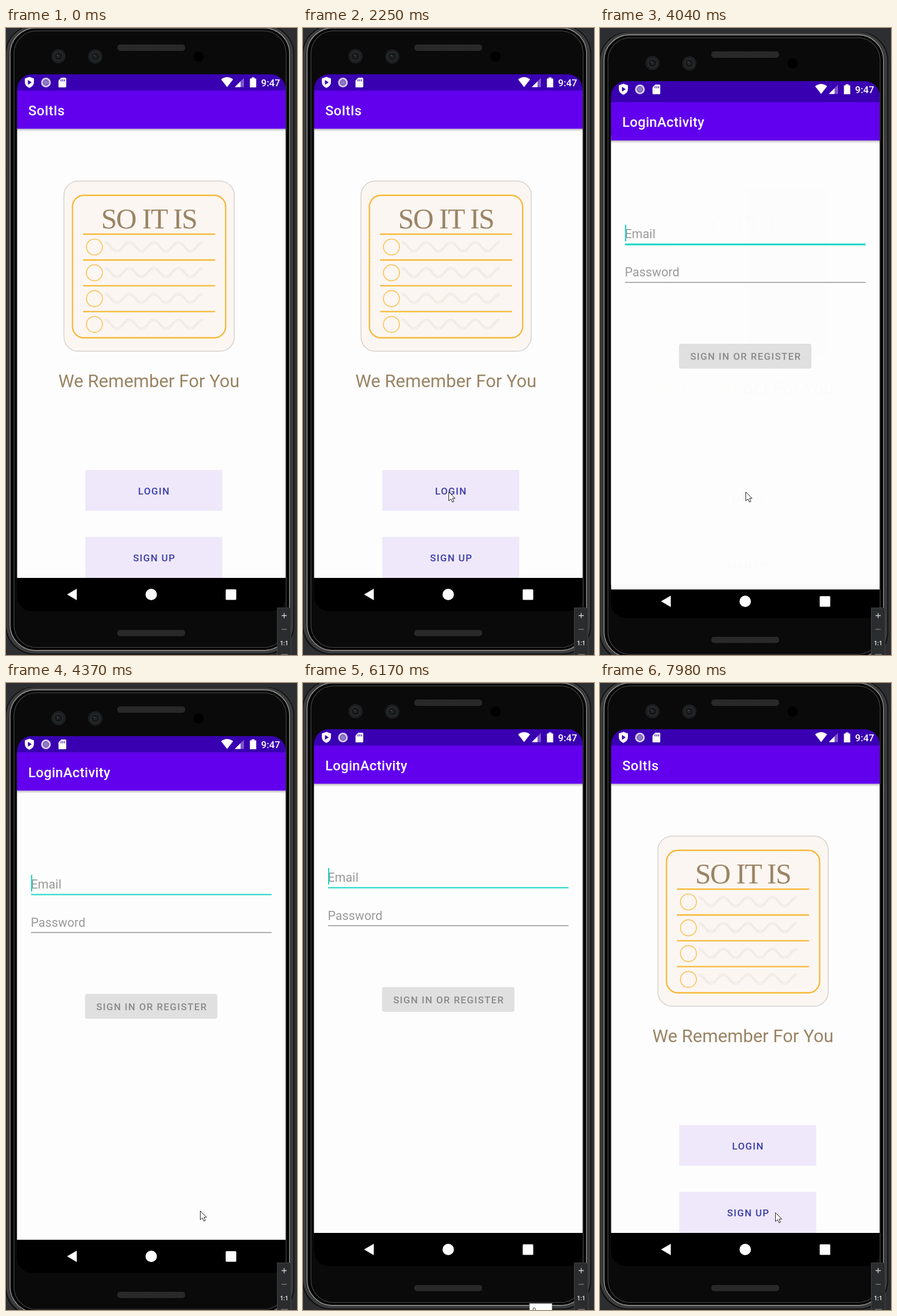
An HTML page that plays this animation: 510 px wide and 1098 px high, repeating every 8 s.

```html
<!DOCTYPE html>
<html lang="en">
<head>
<meta charset="utf-8">
<title>App demo</title>
<style>
html, body { margin: 0; width: 100%; height: 100%; overflow: hidden; background: #2c2e31; }
svg { display: block; width: 510px; height: 1098px; font-family: Roboto, sans-serif; }
.title { font-size: 24px; font-weight: 500; letter-spacing: .3px; fill: #fff; }
.label { font-size: 17px; font-weight: 500; letter-spacing: 1.4px; text-anchor: middle; }
.hint { font-size: 21.5px; letter-spacing: .1px; fill: #999; }
</style>
</head>
<body>
<svg viewBox="0 0 510 1098">
  <defs>
    <clipPath id="screen"><rect x="19.5" y="81" width="470.5" height="940" rx="26"/></clipPath>
    <linearGradient id="shade" x2="0" y2="1">
      <stop stop-color="#000" stop-opacity=".25"/><stop offset="1" stop-color="#000" stop-opacity="0"/>
    </linearGradient>
    <pattern id="mesh" width="3" height="3" patternUnits="userSpaceOnUse">
      <rect width="3" height="3" fill="#303030"/><circle cx="1.5" cy="1.5" r=".9" fill="#171717"/>
    </pattern>
    <g id="window">
      <path d="M19 81h472v29H19z" fill="#3900b1"/>
      <path d="M19 176h472v787H19z" fill="#fdfdfd"/>
      <path d="M19 176.500h472v5H19z" fill="url(#shade)"/>
      <path d="M19 109.500h472v67H19z" fill="#6200ee"/>
      <path d="M19 963h472v70H19z"/>
    </g>
    <g id="camera">
      <circle r="12.500" fill="#1d1f20"/>
      <circle r="7.500" fill="#151617" stroke="#2c3032" stroke-width="1.500"/>
      <circle r="3" fill="#222628"/><circle cx="-2" cy="-2" r="1" fill="#555"/>
    </g>
    <g id="item" fill="none">
      <path d="M135 361H366.500" stroke="#f7b733" stroke-width="2.400"/>
      <circle cx="155" cy="383.500" r="14" stroke="#fbc55a" stroke-width="1.700"/>
      <g stroke="#f1ebe5" stroke-width="2">
        <path id="wave" d="M173 374c10 0 11.500 15 21.500 15s11.500-15 21.500-15 11.500 15 21.500 15 11.500-15 21.500-15 11.500 15 21.500 15 11.500-15 21.500-15 11.500 15 21.500 15 11.500-15 21.500-15"/>
        <use href="#wave" y="3"/>
      </g>
    </g>
  </defs>

  <rect width="510" height="1098" fill="#2c2e31"/>
  <g id="phone">
    <g fill="none">
      <rect x="-1" y="-5" width="506" height="1102" rx="50" fill="#0c0c0c"/>
      <rect x="3" y="-2" width="498" height="1095" rx="48" stroke="#3b3b3b" stroke-width="5"/>
      <rect x="7" y="0" width="490" height="1090" rx="45" stroke="#858585" stroke-width="1.800"/>
      <rect x="10.500" y="3" width="483.500" height="1084" rx="42" fill="#0a0a0a" stroke="#000" stroke-width="4"/>
      <rect x="14" y="5" width="477" height="1080" rx="39" stroke="#3a3a3a" stroke-width="1.500"/>
    </g>
    <rect x="195" y="29" width="119" height="11" rx="5" fill="url(#mesh)"/>
    <rect x="195" y="1054" width="119" height="11" rx="5" fill="url(#mesh)"/>
    <use href="#camera" x="92" y="49.500"/>
    <use href="#camera" x="156.500" y="50"/>
    <circle cx="337.500" cy="50" r="9"/>

    <g clip-path="url(#screen)">
      <g id="home">
        <use href="#window"/>
        <text class="title" x="39" y="152.500">SoItIs</text>
        <rect x="101.500" y="268" width="298.500" height="298" rx="25" fill="#fbf6f2" stroke="#d6d0cb" stroke-width="1.500"/>
        <rect x="116.500" y="293" width="268.500" height="249.500" rx="20" fill="none" stroke="#f7b733" stroke-width="2.300"/>
        <text x="250.500" y="350.500" text-anchor="middle" font-family="'Liberation Serif', serif" font-size="50" letter-spacing="-1.500" fill="#9a8464">SO IT IS</text>
        <use href="#item"/><use href="#item" y="45.200"/><use href="#item" y="90.400"/><use href="#item" y="135.600"/>
        <text x="250.500" y="629" text-anchor="middle" font-size="31.300" fill="#9a8464">We Remember For You</text>
        <path d="M139 774h240v71.500H139zM139 891h240v72H139z" fill="#eee8fa"/>
        <g class="label" fill="#3b3ca8">
          <text x="259.500" y="816.500">LOGIN</text>
          <text x="260" y="934">SIGN UP</text>
        </g>
        <path d="M19 963h472v70H19z"/>
      </g>
      <g id="login">
        <use href="#window"/>
        <text class="title" x="39" y="152.500">LoginActivity</text>
        <text class="hint" x="43.500" y="347.500">Email</text>
        <text class="hint" x="43.500" y="414.500">Password</text>
        <path id="underline" d="M44 358.500H465.500" stroke="#0fd5c3"/>
        <path d="M44 425H465.500" stroke="#929292" stroke-width="1.500"/>
        <path id="caret" d="M45 324V353" stroke="#0fd5c3" stroke-width="2"/>
        <rect x="138.500" y="532.500" width="232" height="43.500" rx="4" fill="#e0e0e0"/>
        <text class="label" x="255.500" y="561" fill="#898989">SIGN IN OR REGISTER</text>
      </g>

      <g fill="#fff">
        <path d="M41 85.500l8 3v6q0 7-8 10.500q-8-3.500-8-10.500v-6z"/>
        <path d="M38.500 91v8.500l6.500-4.200z" fill="#3900b1"/>
        <circle cx="70" cy="95.500" r="8.500" fill="#d9cdf2"/>
        <circle cx="70" cy="95.500" r="5" fill="#8f7ac0" stroke="#5a35b5"/>
        <path d="M97 87h7q1.500 0 1.500 1.500v14q0 1.500-1.500 1.500H93.500q-1.500 0-1.500-1.500V92z"/>
        <path d="M96.500 90v3.500M99.500 90v3.500M102.500 90v3.500" stroke="#3900b1" stroke-width="1.300"/>
        <path d="M377 90q10.500-8 21 0L387.500 103.500z"/>
        <path d="M401 103.500h16v-16z" fill-opacity=".35"/><path d="M401 103.500h10v-10z"/>
        <path d="M427.500 88.500h3v-2h5v2h3v15.500h-11z"/>
        <text x="447" y="101.500" font-size="17" font-weight="500">9:47</text>
        <path d="M107 992l17-10v20z"/>
        <circle cx="254.500" cy="992" r="10"/>
        <rect x="385" y="983" width="18.500" height="18.500" rx="1.500"/>
      </g>
    </g>
  </g>

  <g font-size="10" font-weight="700" text-anchor="middle" fill="#d8d8d8">
    <rect x="475.500" y="1015.500" width="24" height="90" fill="#2a2c2d" stroke="#414345"/>
    <path d="M483 1029h9M487.500 1024.500v9" stroke="#d0d0d0" stroke-width="1.400"/>
    <path d="M483 1053h9M482 1097h12" stroke="#777" stroke-width="1.300"/>
    <text x="487.500" y="1081">1:1</text>
  </g>
  <g id="tooltip">
    <rect x="397" y="1086.500" width="39.500" height="20" fill="#fff" stroke="#777" stroke-width=".7"/>
    <text x="402" y="1102" font-size="10" fill="#333">D</text>
  </g>
  <circle id="press" cx="254.500" cy="813" r="11.500" fill="#f9e66f" opacity=".88"/>
  <path id="cursor" d="M.5.500V16l3.800-3.300 2.500 5.600 2.600-1.200-2.500-5.400h4.600z" fill="#fff" stroke="#222" stroke-width="1"/>
</svg>
<script>
const LOOP = 8000, STEP = 66.5, PHASE = .29;
const el = id => document.getElementById(id);
const [phone, login, underline, caret, tooltip, press, cursor] =
  ['phone', 'login', 'underline', 'caret', 'tooltip', 'press', 'cursor'].map(el);

// Pointer stops: time, x, y
const visits = [
  [[380, 457, 1073], [910, 226, 766], [1180, 250, 800], [1380, 258, 820], [1780, 258, 820],
   [2040, 258, 812], [2180, 258, 812], [2240, 255, 812], [4170, 255, 812], [4500, 385, 983], [4780, 397, 1100]],
  [[6840, 420, 1084], [7630, 315, 928], [7970, 307, 927], [8000, 307, 927]]
];

const clamp = v => Math.min(1, Math.max(0, v));
const smooth = p => p * p * (3 - 2 * p);
const show = (node, on) => node.setAttribute('visibility', on ? 'inherit' : 'hidden');
const within = (t, from, to) => t >= from && t < to;

function pointer(stops, t) {
  const i = Math.max(1, stops.findIndex(s => s[0] > t));
  const [a, b] = [stops[i - 1], stops[i]];
  const p = smooth(clamp((t - a[0]) / (b[0] - a[0])));
  return [1, 2].map(k => Math.round(a[k] + (b[k] - a[k]) * p));
}

function draw(t) {
  const tick = (Math.floor(t / STEP + PHASE) - PHASE) * STEP;

  phone.setAttribute('transform', `translate(0 ${within(t, 3710, 6170) ? 12 : 0})`);

  show(login, within(t, 3840, 6240));
  const rise = 70 * (1 - clamp((tick - 3810) / 450)) ** 3;
  login.setAttribute('transform', `translate(0 ${rise})`);
  login.setAttribute('opacity', clamp((tick - 3810) / 230));
  underline.setAttribute('stroke-width', t < 4300 ? 3 : 2);
  show(caret, within(t, 3840, 4510) || within(t, 4980, 5440) || within(t, 5910, 6240));

  show(tooltip, within(t, 5840, 6240));
  show(press, within(t, 3710, 3910));

  const visit = visits.find(v => within(t, v[0][0], v.at(-1)[0]));
  show(cursor, visit);
  if (visit) cursor.setAttribute('transform', `translate(${pointer(visit, tick)})`);
}

const start = performance.now();
function frame() {
  draw((performance.now() - start) % LOOP);
  requestAnimationFrame(frame);
}
frame();
</script>
</body>
</html>
```
